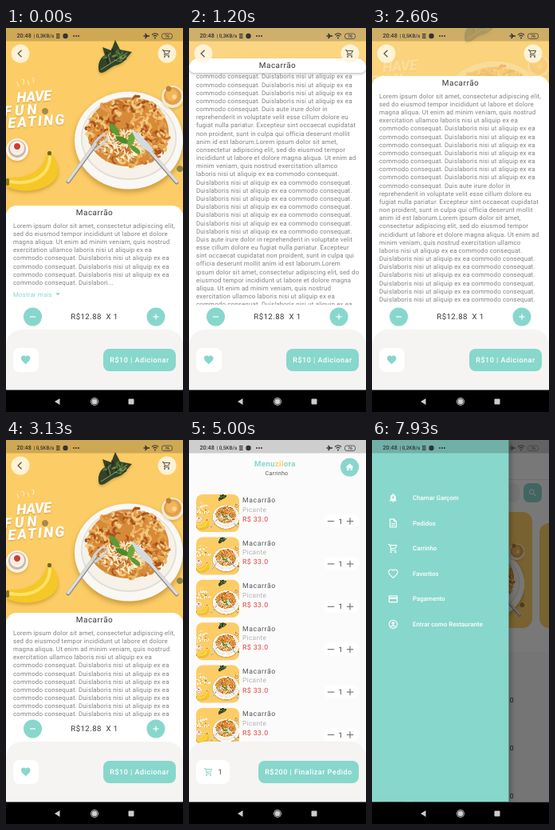
These frames come from a looping animation (222x480 px, 8 s). An HTML page with a canvas:

```html
<!DOCTYPE html>
<html lang="pt">
<head>
<meta charset="utf-8">
<title>Cardápio</title>
<style>
html, body { margin: 0; width: 222px; height: 480px; overflow: hidden; background: #000; }
canvas { display: block; width: 222px; height: 480px; }
</style>
</head>
<body>
<canvas></canvas>
<script>
const W = 222, H = 480, LOOP = 8000, NAV = 452.4;
const TEAL = '#88d7cc', AMBER = '#fccd66', INK = '#3a3a3a', GREY = '#808080';
const canvas = document.querySelector('canvas');
const dpr = window.devicePixelRatio || 1;
canvas.width = W * dpr;
canvas.height = H * dpr;
let g = canvas.getContext('2d');

const icons = {
  cart: 'M15.55 13c.75 0 1.41-.41 1.75-1.03l3.58-6.49A1 1 0 0 0 20 4H5.2l-.93-2H1v2h2l3.6 7.59-1.35 2.44C4.52 15.37 5.48 17 7 17h12v-2H7l1.1-2zM6.16 6h12.15l-2.76 5H8.53zM7 18a2 2 0 1 0 0 4 2 2 0 0 0 0-4zM17 18a2 2 0 1 0 0 4 2 2 0 0 0 0-4z',
  heart: 'M12 21.35l-1.45-1.32C5.4 15.36 2 12.28 2 8.5 2 5.42 4.42 3 7.5 3c1.74 0 3.41.81 4.5 2.09C13.09 3.81 14.76 3 16.5 3 19.58 3 22 5.42 22 8.5c0 3.78-3.4 6.86-8.55 11.54z',
  home: 'M10 20v-6h4v6h5v-8h3L12 3 2 12h3v8z',
  search: 'M15.5 14h-.8l-.27-.27A6.5 6.5 0 1 0 13.73 14.43l.27.28v.79l5 5L20.5 19zM9.5 14a4.5 4.5 0 1 1 0-9 4.5 4.5 0 0 1 0 9z',
  bell: 'M12 22a2 2 0 0 0 2-2h-4a2 2 0 0 0 2 2zM18 16v-5c0-3.1-1.6-5.6-4.5-6.3V4a1.5 1.5 0 0 0-3 0v.7C7.6 5.4 6 7.9 6 11v5l-2 2v1h16v-1zM11 8h2v2h2v2h-2v2h-2v-2H9v-2h2z',
  page: 'M14 2H6a2 2 0 0 0-2 2v16a2 2 0 0 0 2 2h12a2 2 0 0 0 2-2V8zM18 20H6V4h7v5h5zM8 12h8v2H8zM8 16h8v2H8z',
  card: 'M20 4H4a2 2 0 0 0-2 2v12a2 2 0 0 0 2 2h16a2 2 0 0 0 2-2V6a2 2 0 0 0-2-2zM20 18H4v-6h16zM20 8H4V6h16z',
  person: 'M12 2a10 10 0 1 0 0 20 10 10 0 0 0 0-20zM12 4a8 8 0 1 1 0 16 8 8 0 0 1 0-16zM12 6a3.5 3.5 0 1 0 0 7 3.5 3.5 0 0 0 0-7zM6 17c2-4 10-4 12 0l-1.5 1.2c-2-2.4-7-2.4-9 0z',
};

// ---- helpers ----
const clamp = v => Math.max(0, Math.min(1, v));
const smooth = v => v * v * (3 - 2 * v);

function along(stops, t) {
  if (t <= stops[0][0]) return stops[0][1];
  for (let i = 1; i < stops.length; i++) {
    const [t0, v0] = stops[i - 1], [t1, v1] = stops[i];
    if (t < t1) return v0 + (v1 - v0) * smooth((t - t0) / (t1 - t0));
  }
  return stops[stops.length - 1][1];
}

function rect(x, y, w, h, color, r = 0) {
  g.fillStyle = color;
  g.beginPath();
  g.roundRect(x, y, w, h, r);
  g.fill();
}

function oval(x, y, rx, ry, color, turn = 0) {
  g.fillStyle = color;
  g.beginPath();
  g.ellipse(x, y, rx, ry, turn, 0, 7);
  g.fill();
}
const disc = (x, y, r, color) => oval(x, y, r, r, color);

function path(d, color, width = 0) {
  const p = new Path2D(d);
  g.fillStyle = g.strokeStyle = color;
  g.lineWidth = width;
  if (width) g.stroke(p); else g.fill(p, 'evenodd');
}

function icon(name, x, y, size, color, width) {
  g.save();
  g.translate(x - size / 2, y - size / 2);
  g.scale(size / 24, size / 24);
  path(icons[name], color, width);
  g.restore();
}

// y is the middle of the capitals
function text(s, x, y, size, color, weight = 400, gap = 0, align = 'left') {
  g.textRendering = 'geometricPrecision';
  g.font = `${weight} ${size}px Roboto, sans-serif`;
  g.letterSpacing = gap + 'px';
  g.textAlign = align;
  g.fillStyle = color;
  g.fillText(s, x, y + size * .34);
}

function shadow(color, blur, dy = 0) {
  g.shadowColor = color;
  g.shadowBlur = blur * dpr;
  g.shadowOffsetY = dy * dpr;
}
const noShadow = () => shadow('transparent', 0);

function clipped(x, y, w, h, r, draw) {
  g.save();
  g.beginPath();
  g.roundRect(x, y, w, h, r);
  g.clip();
  draw();
  g.restore();
}

function sign(x, y, color, plus, r = 3.6) {
  rect(x - r, y - .6, 2 * r, 1.2, color);
  if (plus) rect(x - .6, y - r, 1.2, 2 * r, color);
}

// ---- food picture, drawn once ----
const food = document.createElement('canvas');
food.width = W * 2;
food.height = 260 * 2;

function paintFood() {
  let seed = 7;
  const rnd = () => (seed = seed * 16807 % 2147483647) / 2147483647;
  const pick = list => list[Math.floor(rnd() * list.length)];
  // Calls draw(x, y) at random points of an ellipse
  const scatter = (n, x, y, rx, ry, draw) => {
    while (n--) {
      const a = rnd() * 7, d = Math.sqrt(rnd());
      draw(x + rx * d * Math.cos(a), y + ry * d * Math.sin(a));
    }
  };
  g.scale(2, 2);
  rect(0, 0, W, 260, AMBER);
  g.lineCap = 'round';

  path('M14 68l2 5M20 64q4 1 2 6M27 66l2 5M33 62q3 2 1 6', '#fff0cf', 1);
  g.save();
  g.rotate(-.07);
  shadow('rgba(150,95,0,.4)', 3, 2);
  text('HAVE', 7, 88, 18, '#fff', 'italic 800', -.4);
  text('FUN', -10, 104, 18, '#fff', 'italic 800', 4);
  text('EATING', -6, 119, 18, '#fff', 'italic 800', 2);
  g.restore();

  disc(49, 104, 4, '#a58a4c');
  shadow('rgba(140,85,0,.3)', 6, 3);
  disc(14, 152, 14, '#fbf3e6');
  noShadow();
  disc(14, 151, 11, '#c9b7a4');
  disc(14, 150, 9, '#f7efe8');
  disc(14, 148, 4, '#cf3d31');

  shadow('rgba(140,85,0,.35)', 8, 5);
  path('M55 156C65 166 70 181 60 191 46 205 18 207 1 198L1 187C24 189 46 180 52 158Z', '#f5c727');
  noShadow();
  path('M55 162C54 186 30 197 6 192', '#ffe267', 4);
  rect(52, 154, 5, 5, '#766426', 2);
  rect(0, 188, 4, 9, '#8c7a2a', 2);

  shadow('rgba(120,80,0,.3)', 6, 4);
  path('M117 55C114 46 118 37 124 34L121 24 132 28 137 15 143 27 158 30C150 38 149 43 140 46 130 48 123 59 117 55Z', '#33422a');
  noShadow();
  scatter(26, 135, 37, 15, 9, (x, y) => oval(x, y, 3.2, 1.2, pick(['#4c6c36', '#22301e', '#6f8c4a']), rnd() * 6));
  path('M119 52L152 31M131 43L128 33M136 40L144 42', '#8ba35c', .8);

  shadow('rgba(125,75,0,.4)', 14, 7);
  oval(154, 140.5, 68, 61, '#faf8f4');
  noShadow();
  oval(154, 138, 60, 52, '#e3ddd3');
  oval(154, 137.5, 58.5, 50.5, '#f6f2ea');
  oval(153, 130, 51, 43, '#d58b3a');
  scatter(330, 153, 130, 51, 42, (x, y) => {
    const turn = rnd() * 6;
    g.strokeStyle = pick(['#e5a04a', '#efb763', '#c4722e', '#a8511f', '#f3ca82', '#d98836']);
    g.lineWidth = 1.5 + rnd() * 2;
    g.beginPath();
    g.arc(x, y, 2 + rnd() * 4, turn, turn + 2);
    g.stroke();
  });
  scatter(150, 147, 146, 28, 20, (x, y) =>
    oval(x, y, 3.4, .9, pick(['#fff4d8', '#f7e6bd', '#ecd09a']), rnd() * 6));
  oval(136, 127, 9, 4, '#5b9a35', .9);
  oval(146, 140, 9, 3.5, '#4b8a2d', .4);
  oval(157, 139, 9, 4, '#69a93c', 1.9);
  oval(162, 152, 8, 3, '#5b9a35', .7);
  path('M78 192L112 146M214 193L180 154', '#8f8c8a', 5);
  path('M78 191L112 145M214 192L180 153', '#dcdcdc', 3.5);
  path('M108 150Q113 138 123 133M112 152Q119 148 127 138', '#cdd2d8', 3);
  path('M182 157C172 150 162 141 157 127 166 131 178 142 185 152Z', '#d5dae0');

  shadow('rgba(140,85,0,.3)', 6, 3);
  disc(209, 86, 14, '#f9e9cd');
  noShadow();
  disc(209, 85, 11, '#e3a04b');
  disc(208, 84, 7.5, '#f2b559');
  disc(211, 86, 3, '#f9d693');
  disc(204, 76, 3.5, '#b98238');
  disc(218, 176, 4, '#8b8442');
}
const screen = g;
g = food.getContext('2d');
paintFood();
g = screen;

// ---- description text ----
const more = 'commodo consequat. Duislaboris nisi ut aliquip ex ea';
const seven = s => Array(7).fill(s);
const tail = [
  'commodo consequat. Duis aute irure dolor in',
  'reprehenderit in voluptate velit esse cillum dolore eu',
  'fugiat nulla pariatur. Excepteur sint occaecat cupidatat',
  'non proident, sunt in culpa qui officia deserunt mollit',
];
const exercise = 'exercitation ullamco laboris nisi ut aliquip ex ea';
const full = [
  'Lorem ipsum dolor sit amet, consectetur adipiscing elit,',
  'sed do eiusmod tempor incididunt ut labore et dolore',
  'magna aliqua. Ut enim ad minim veniam, quis nostrud',
  exercise, ...seven(more), ...tail,
  'anim id est laborum.Lorem ipsum dolor sit amet,',
  'consectetur adipiscing elit, sed do eiusmod tempor',
  'incididunt ut labore et dolore magna aliqua. Ut enim ad',
  'minim veniam, quis nostrud exercitation ullamco',
  'laboris nisi ut aliquip ex ea commodo consequat.',
  ...seven('Duislaboris nisi ut aliquip ex ea commodo consequat.'),
  'Duis aute irure dolor in reprehenderit in voluptate velit',
  'esse cillum dolore eu fugiat nulla pariatur. Excepteur',
  'sint occaecat cupidatat non proident, sunt in culpa qui',
  'officia deserunt mollit anim id est laborum.Lorem',
  'ipsum dolor sit amet, consectetur adipiscing elit, sed do',
  'eiusmod tempor incididunt ut labore et dolore magna',
  'aliqua. Ut enim ad minim veniam, quis nostrud',
  exercise, ...seven(more), ...tail,
  'anim id est laborum.',
];
const brief = [...full.slice(0, 7), 'commodo consequat. Duislabori...'];
const scrollStops = [[200, 0], [800, 195], [930, 198], [1730, 421], [1860, 421], [3130, 6], [3400, 0]];

// ---- screens ----
function bottomPanel(leftWidth, buttonX, label) {
  rect(0, 377, W, 90, '#f5f4f3', 20);
  rect(9, 400, leftWidth, 30, '#fff', 8);
  rect(buttonX, 401, 213 - buttonX, 28, TEAL, 8);
  text(label, (buttonX + 213) / 2, 415, 9, '#fff', 500, .5, 'center');
}

function detail(t) {
  const scroll = along(scrollStops, t);
  const fold = Math.min(scroll, 184), top = 222 - fold;
  const open = t >= 200, lines = open ? full : brief;

  rect(0, 0, W, NAV, '#fff');
  rect(0, 0, W, top + 20, '#fbd582');
  clipped(0, 0, W, top + 20, 0, () => {
    g.globalAlpha *= 1 - clamp((fold - 90) / 90);
    g.drawImage(food, 0, -Math.max(0, fold - 10) * .25, W, 260);
  });
  rect(0, top, W, NAV - top, '#fff', 14);

  clipped(0, top + 18, W, 346 - top - 18, 0, () => {
    const y0 = 247 - scroll;
    lines.forEach((s, i) => text(s, 9, y0 + i * 10.17, 7.91, GREY, 400, .157));
    const end = y0 + lines.length * 10.17 + 4.5;
    text(open ? 'Mostrar menos' : 'Mostrar mais', 9, end, 7.91, TEAL, 400, .157);
    const ax = open ? 72 : 65, d = open ? -1.5 : 1.5;
    path(`M${ax - 3} ${end - d}h6l-3 ${2 * d}z`, TEAL);
    if (open) text('Observações', 9, end + 24.5, 8.5, '#666');
  });
  if (scroll > 184) shadow('rgba(0,0,0,.25)', 3, 1.5);
  rect(0, top, W, 18, '#fff', scroll > 184 ? [14, 14, 8, 8] : [14, 14, 0, 0]);
  noShadow();
  text('Macarrão', 111, top + 8.7, 10, INK, 400, .5, 'center');

  disc(18, 32, 11.5, 'rgba(255,246,225,.9)');
  path('M19.5 27.8l-4.4 4.2 4.4 4.2', '#555', 1.2);
  disc(202, 32, 11.5, 'rgba(255,246,225,.9)');
  icon('cart', 201.5, 32, 12, '#555');

  rect(0, 346, W, 60, '#fff');
  disc(33.5, 361, 11.5, TEAL);
  sign(33.5, 361, '#fff');
  disc(188, 361, 11.5, TEAL);
  sign(188, 361, '#fff', true);
  text('R$12.88  X 1', 111, 361.2, 9.6, INK, 400, .45, 'center');
  bottomPanel(32, 122, 'R$10 | Adicionar');
  icon('heart', 24.7, 414.8, 14, TEAL);
}

function brand(y) {
  let x = 82;
  for (const [s, color] of [['Menu', TEAL], ['zil', AMBER], ['ora', TEAL]]) {
    text(s, x, y, 9.7, color, 700, .3);
    x += g.measureText(s).width;
  }
}

function thumb(x, y) {
  clipped(x, y, 54, 47, 8, () => g.drawImage(food, x, y - 5.6, 54, 62.4));
}

function cart(t) {
  const u = clamp((t - 6000) / 550), scroll = 18 * Math.sin(Math.PI * u) ** 2;
  rect(0, 0, W, H, '#fbfbfb');
  clipped(0, 56, W, 400, 0, () => {
    for (let i = 0; i < 6; i++) {
      const y = 68 + i * 53.4 - scroll;
      thumb(9, y);
      text('Macarrão', 67, y + 7.5, 8.7, '#555', 400, .6);
      text('Picante', 67, y + 19, 8.4, '#b3b3b3', 400, .3);
      text('R$ 33.0', 67, y + 31, 8.7, '#e5655c', 500, .4);
      rect(169, y + 25, 44, 16, '#fff', 7);
      sign(178, y + 33.5, '#777', false, 4.2);
      text('1', 190, y + 33.5, 9, INK, 400, 0, 'center');
      sign(202, y + 33.5, '#777', true, 4.2);
    }
  });
  brand(30);
  text('Carrinho', 110, 42, 7.2, '#555', 400, .2, 'center');
  disc(201.5, 34, 11.5, TEAL);
  icon('home', 201.5, 34, 12, '#fff');
  bottomPanel(42, 87, 'R$200 | Finalizar Pedido');
  icon('cart', 24.5, 415, 12, TEAL);
  text('1', 39, 415, 9, INK, 400, 0, 'center');
}

function home() {
  rect(0, 0, W, H, '#fbfbfb');
  rect(0, 49, W, 1, '#e4e4e4');
  brand(32);
  for (const y of [28, 32, 36]) rect(14, y - .6, 12, 1.2, INK);
  rect(9, 54, 176, 24, '#f0f0f0', 7);
  rect(190, 54, 23, 24, TEAL, 7);
  icon('search', 201.5, 66, 12, '#fff');
  clipped(21, 90, 180, 145, 12, () => {
    rect(21, 90, 180, 145, AMBER);
    g.drawImage(food, 27, 76, W * .74, 260 * .74);
  });
  rect(-20, 104, 32, 131, AMBER, 12);
  rect(210, 104, 32, 131, AMBER, 12);
  rect(0, 265, W, 190, '#f6f6f6');
  for (let y = 325; y < NAV; y += 60) {
    thumb(9, y - 34);
    text('Macarrão', 72, y - 20, 8.7, '#555', 400, .6);
    text('R$ 33.0', 178, y, 8.7, INK, 400, .4, 'right');
  }
}

const menu = [
  ['bell', 'Chamar Garçom'], ['page', 'Pedidos'], ['cart', 'Carrinho'],
  ['heart', 'Favoritos'], ['card', 'Pagamento'], ['person', 'Entrar como Restaurante'],
];

function drawer(t) {
  const p = 1 - (1 - clamp((t - 7720) / 200)) ** 2;
  if (!p) return;
  rect(0, 0, W, NAV, `rgba(0,0,0,${.52 * p})`);
  g.save();
  g.translate(171.5 * (p - 1), 0);
  shadow('rgba(0,0,0,.45)', 8);
  rect(0, 0, 171.5, NAV, TEAL);
  noShadow();
  menu.forEach(([name, label], i) => {
    const y = 72.3 + i * 31.6;
    icon(name, 26.5, y, 13.5, '#fff', name === 'heart' ? 2 : 0);
    text(label, 51, y, 7.91, '#fff', 500);
  });
  g.restore();
}

// Fades in while rising from a quarter of the stage height
function enter(t, start, draw) {
  const p = clamp((t - start) / 300);
  g.save();
  g.globalAlpha = p ** 1.7;
  g.translate(0, 120 * (1 - p) ** 2.16);
  draw(t);
  g.restore();
}

function statusBar(t) {
  const rate = t < 2500 ? '0,3' : t < 6900 ? '0,5' : '0,2', ink = '#333';
  rect(0, 0, W, 16.5, 'rgba(0,0,0,.18)');
  text('20:48', 13.5, 10, 7.2, ink, 500);
  text(`| ${rate}KB/s`, 34.5, 10, 6.4, ink, 500);
  for (const y of [7, 9.3, 11.6]) rect(63, y, 4.5, 1.3, ink);
  disc(74.5, 10, 3.2, ink);
  for (const x of [85, 88, 91]) disc(x, 10, 1, ink);
  path('M172.5 10h7.5M177 10l-2.5-3M177 10l-2.5 3', ink, 1.4);
  path('M183 8.5q4-3.4 8 0M184.6 10.4q2.4-2 4.8 0', ink, 1.1);
  disc(187, 12.4, 1, ink);
  g.strokeStyle = '#444';
  g.lineWidth = .8;
  g.beginPath();
  g.roundRect(195.5, 7, 13, 6.5, 2.5);
  g.stroke();
  text('76', 202, 10.3, 5, ink, 500, 0, 'center');
}

function navBar() {
  rect(0, NAV, W, H - NAV, '#000');
  path('M61 467l6.5-4v8z', '#ccc');
  disc(111, 467, 5, '#b5b5b5');
  disc(111, 467, 4, '#333');
  disc(111, 467, 3.3, '#d0d0d0');
  rect(153.5, 463.5, 7, 7, '#ccc', 1);
}

function frame(now) {
  const t = now % LOOP;
  g.setTransform(dpr, 0, 0, dpr, 0, 0);
  if (t < 4345) detail(t);
  if (t >= 4270 && t < 7030) enter(t, 4045, cart);
  if (t >= 6730) enter(t, 6690, home);
  drawer(t);
  statusBar(t);
  navBar();
  requestAnimationFrame(frame);
}
requestAnimationFrame(frame);
</script>
</body>
</html>
```
